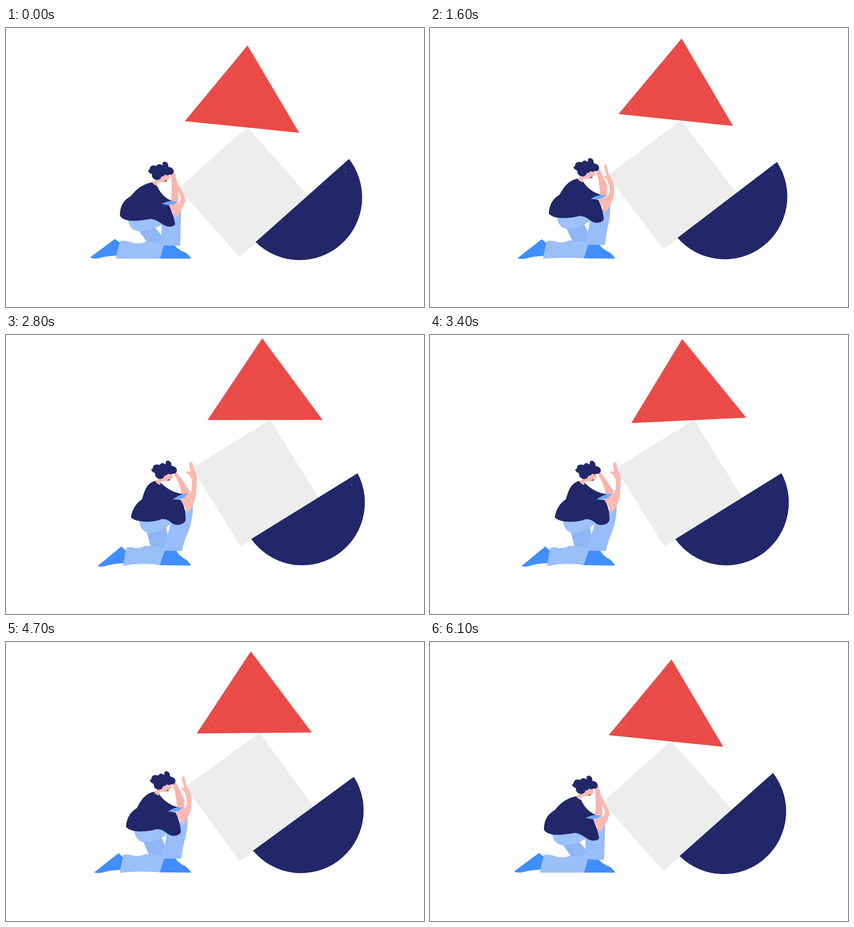
An HTML page that plays this animation: 917x611 px, repeating every 7 s.

```html
<!DOCTYPE html>
<html lang="en">
<head>
<meta charset="utf-8">
<title>Balancing shapes</title>
<style>
html, body { margin: 0; width: 100%; height: 100%; overflow: hidden; background: #fff; }
svg { display: block; width: 100%; height: 100%; }
</style>
</head>
<body>
<svg viewBox="0 0 917 611">
  <g id="base">
    <rect id="block" x="-185.3" y="-191" width="201.8" height="202" fill="#ededed"/>
    <path d="M-137,9.5 A137.3,137.3 0 0 0 137,9.5 Z" fill="#212768"/>
    <g id="baseDots" fill="#8c94c4"></g>
  </g>
  <g id="roof">
    <path d="M-137,.3 L-16.8,-178.5 L115.4,.3 Z" fill="#ea4b48"/>
    <g id="roofDots" fill="#f6b9b0"></g>
  </g>
  <g id="body"></g>
  <g id="head">
    <path fill="#fbb9b1" d="M338,322 L358,319 L359,328 Q360,332 355,332 Q354,338 345,338 Q338,337 333,338 L331,346 Q322,342 321,338 L330,331 Z"/>
    <path fill="none" stroke="#212768" stroke-width="1.5" d="M348,336 Q350,333.5 353,335"/>
    <path fill="#212768" d="M320,320 Q313,318 311,311 Q314,313 315,309 Q316,300 326,301 Q329,303 331,301 Q334,296 340,299 L344,301 Q341,293 349,292.5 Q357,295 356,304 Q366,305 368,313 Q367,323 358,321 Q354,324 349,321 Q345,326 341,325 Q339,333 330,333 Q319,330 320,320 Z"/>
  </g>
</svg>
<script>
const NS = 'http://www.w3.org/2000/svg';
const $ = id => document.getElementById(id);
const lerp = (a, b, k) => a + (b - a) * k;

function add(parent, tag, attrs) {
  const el = document.createElementNS(NS, tag);
  for (const key in attrs) el.setAttribute(key, attrs[key]);
  parent.appendChild(el);
  return el;
}

// Each part: fill, crouched outline, pushing outline
const parts = [
  ['#408eff', // rear shoe
    'M185,502 L239,462 L252,472 L246,498 Q215,500 202,504.5 Q189,506 185,502 Z',
    'M201,506 L253,463 L265,474 L262,500 Q238,499 216,506.5 Q205,508 201,506 Z'],
  ['#8fb6f5', // rear shin
    'M290,442 L328,438 L342,455 L345,478 L302,474 L308,467 Z',
    'M309,430 L351,419 L355,440 L350,472 L308,470 L317,464 Z'],
  ['#9bbff9', // rear trouser leg
    'M251,466 Q265,465 276,470 Q292,474 306,468 L340,471 L352,478 L340,505 Q290,505 241,505 Q245,482 251,466 Z',
    'M264,466 Q274,463 284,467 Q298,466 306,461 L340,466 L351,473 L338,504 Q300,497 257,506 Q260,484 264,466 Z'],
  ['#408eff', // front shoe
    'M346,476 L369,476 Q380,487 394,492 Q403,498 406,505 L338,505 Z',
    'M349,471 L373,471 Q380,485 394,491 Q402,498 406,505 L337,504 Z'],
  ['#9dc2fb', // thigh
    'M267,416 Q270,443 290,445 Q315,447 345,429 L345,410 Z',
    'M292,404 Q294,431 313,433 Q338,434 365,411 L365,398 Z'],
  ['#98bdf9', // front leg
    'M341,425 L384,398 Q384,420 383,440 Q383,460 382,477 L335,476 Q340,460 341,450 Z',
    'M364,405 L410,372 Q411,404 398,435 Q389,456 386,473 L339,472 Q351,454 355,435 Z'],
  ['#f9b5ad', // far arm
    'M361,322 L368,311 Q374,330 378,350 L378,384 L362,381 Q365,350 362,322 Z',
    'M368,304 L372,298 Q388,318 403,342 L400,352 L386,350 Q382,325 368,304 Z'],
  ['#212768', // shirt
    'M320,338 C295,343 282,358 274,368 C256,378 250,392 250,411 C258,425 285,424 318,418 C338,421 345,436 360,435 C368,434 371,431 371,429 C368,412 362,398 358,388 L343,385 L364,379 C345,370 338,360 330,343 Q326,336 320,338 Z',
    'M325,320 C305,327 303,348 298,360 C284,370 277,382 274,399 C285,412 325,411 342,403 C362,403 360,415 376,416 C390,415 394,408 394,404 C394,390 393,376 383,361 L367,359 L388,348 C368,346 352,336 340,324 Q333,318 325,320 Z'],
  ['#fbb9b1', // near arm and hand
    'M358,389 L376,384 Q384,380 384,372 L380,362 Q378,355 372,344 Q374,342 376,346 L366,320 Q366,308 370,318 L376,338 Q385,354 390,364 Q395,372 393,380 Q388,398 371,418 Q366,400 358,389 Z',
    'M383,361 L400,350 Q408,342 408,330 L408,318 Q406,308 395,301 Q396,296 404,300 L402,282 Q406,274 410,282 L411,292 Q419,304 419,314 Q418,335 417,350 Q414,370 398,391 Q392,372 383,361 Z'],
  ['#74a7f3', // sleeve opening
    'M342,385 Q358,376 376,381 Q366,392 342,385 Z',
    'M366,360 Q382,347 399,347 Q390,363 366,360 Z']
].map(([fill, from, to]) => ({
  el: add($('body'), 'path', { fill }),
  from,
  to: to.match(/-?[\d.]+/g).map(Number)
}));

function morph({ el, from, to }, k) {
  let i = 0;
  el.setAttribute('d', from.replace(/-?[\d.]+/g, n => lerp(+n, to[i++], k).toFixed(2)));
}

let seed = 7;
const rand = () => (seed = seed * 16807 % 2147483647) / 2147483647;
function speckle(id, count, place) {
  for (let i = 0; i < count; i++) {
    const [cx, cy] = place(rand(), rand());
    add($(id), 'circle', { cx, cy, r: 0.45 + rand() * 0.25 });
  }
}
speckle('roofDots', 14, (a, b) => {
  const x = 14 + a * 30;
  return [x - 136.7, -2 - b * (x * 1.4 - 5)];
});
speckle('baseDots', 9, (a, b) => [103 + a * 26, 14 + b * 20]);

// Monotone cubic through [time, value] keys
function curve(keys) {
  const slope = i => (keys[i + 1][1] - keys[i][1]) / (keys[i + 1][0] - keys[i][0]);
  const tangent = i => {
    if (i === 0 || i === keys.length - 1) return 0;
    const a = slope(i - 1), b = slope(i);
    return a * b > 0 ? 2 * a * b / (a + b) : 0;
  };
  return t => {
    if (t <= keys[0][0]) return keys[0][1];
    const n = keys.findIndex(key => key[0] > t);
    if (n < 0) return keys[keys.length - 1][1];
    const [t0, v0] = keys[n - 1], [t1, v1] = keys[n];
    const d = t1 - t0, u = (t - t0) / d, w = 1 - u;
    return v0 * (1 + 2 * u) * w * w + v1 * u * u * (3 - 2 * u)
      + d * u * w * (tangent(n - 1) * w - tangent(n) * u);
  };
}
const push = curve([[700, 0], [1100, .07], [1400, .25], [2000, .83], [2200, .91],
  [2800, 1], [4000, .95], [4600, .62], [5400, .04], [6100, 0]]);
const tilt = curve([[700, 5.8], [1100, 5.4], [2000, 6.4], [2800, -.1],
  [4000, -3.9], [5400, 4.1], [6100, 5.8]]);

function draw(t) {
  const k = push(t);
  const cx = lerp(643.7, 649.7, k), cy = lerp(370.7, 366.7, k);
  const angle = lerp(-41.6, -31.7, k), slide = 19.5 * k;
  $('base').setAttribute('transform', `translate(${cx} ${cy}) rotate(${angle})`);
  $('block').setAttribute('transform', `translate(${slide} 0)`);

  // The roof pivots near the block's top corner
  const a = angle * Math.PI / 180, x = 15.5 + slide, y = -191;
  const px = cx + x * Math.cos(a) - y * Math.sin(a);
  const py = cy + x * Math.sin(a) + y * Math.cos(a);
  $('roof').setAttribute('transform', `translate(${px} ${py}) rotate(${tilt(t)})`);

  $('head').setAttribute('transform', `translate(${7 * k} ${-17.5 * k})`);
  parts.forEach(part => morph(part, k));
}

const start = performance.now();
function tick() {
  const t = (performance.now() - start) % 7000;
  draw(Math.floor(t / 100) * 100);
  requestAnimationFrame(tick);
}
tick();
</script>
</body>
</html>
```
